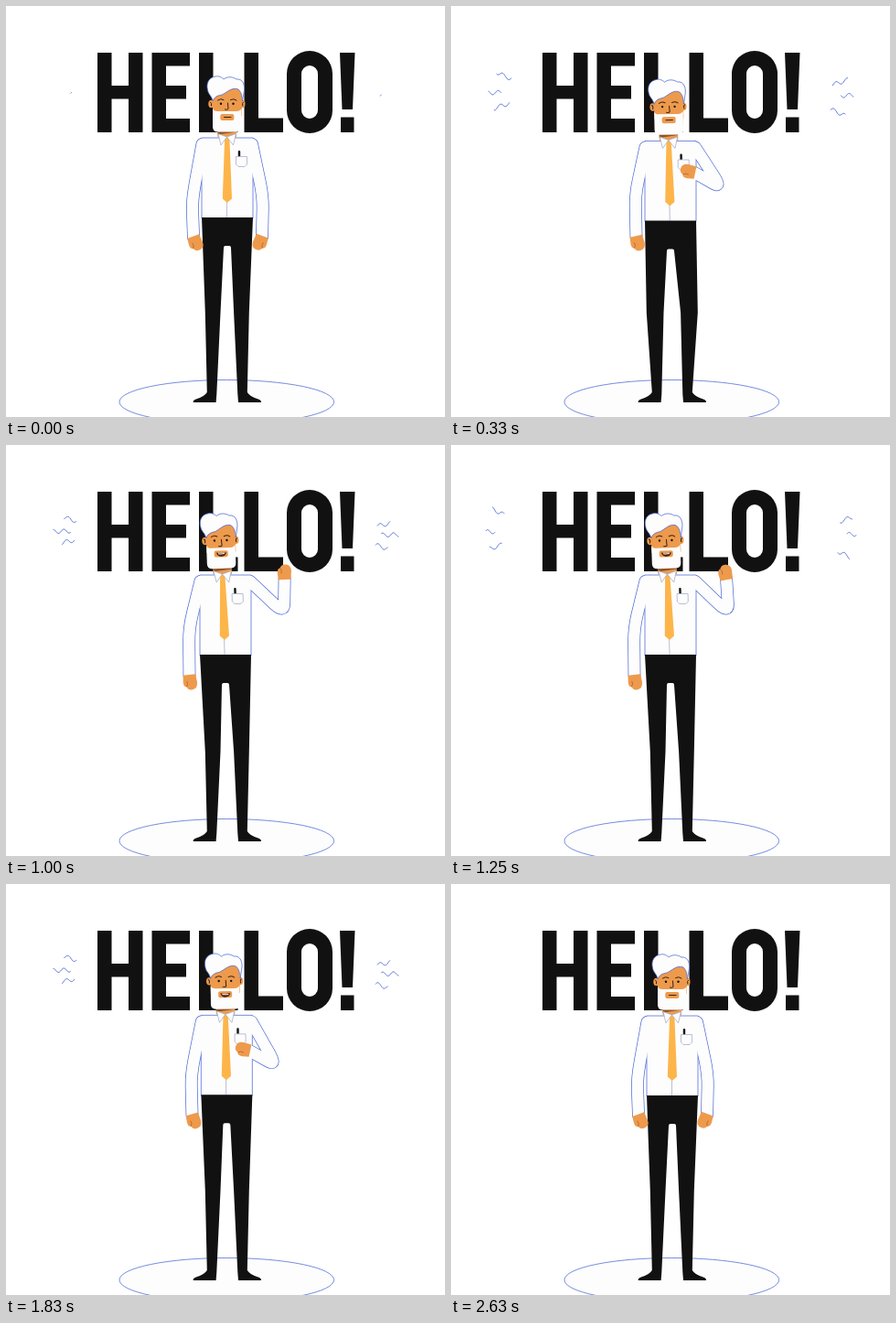
An HTML page for the animation above (2680 ms loop, 480 by 449 pixels).

```html
<!DOCTYPE html>
<html lang="en">
<head>
<meta charset="utf-8">
<title>Hello</title>
<style>
  html, body { margin: 0; width: 100%; height: 100%; overflow: hidden; background: #fff; }
  svg { display: block; width: 100%; height: 100%; }
  .ink { fill: #111; }
  .skin { fill: #ee9a4c; }
  .cloth { fill: #fdfdfd; }
  .line { stroke: #4a66d4; stroke-width: .75; }
  .thin { stroke: #a3abc6; stroke-width: .75; }
  .dark { fill: none; stroke: #33231c; stroke-linecap: round; }
  .arm { fill: none; stroke-linecap: round; stroke-linejoin: round; }
  .edge { stroke: #4a66d4; stroke-width: 13.8; }
  .sleeve { stroke: #fdfdfd; stroke-width: 12.4; }
  .spark { fill: none; stroke: #4a66d4; stroke-width: .9; }
</style>
</head>
<body>
<svg viewBox="0 0 480 449">
  <defs>
    <g id="fist">
      <path class="skin" d="M-6.800 1L-7.600 -6Q-8 -11 -4.500 -12Q-3 -16 1.500 -15.500Q7.500 -15 7.600 -8L6.800 1Z"/>
      <path d="M-4.500 -11.500Q-2 -9 -3.500 -5.500" fill="none" stroke="#a8602a" stroke-width=".7"/>
    </g>
  </defs>

  <g role="img" aria-label="HELLO!" class="ink" fill-rule="evenodd">
    <path d="M100 51H115.500V87H134V51H149.500V138H134V101.500H115.500V138H100Z"/>
    <path d="M159.500 51H201V65.500H175V87H197V101.500H175V123H201V138H159.500Z"/>
    <path id="ell" d="M211 51H226.500V122.500H253.500V138H211Z"/>
    <use href="#ell" x="49.500"/>
    <path d="M307 74A25 25 0 0 1 357 74V114A25 25 0 0 1 307 114ZM323 74V114A9 9 0 0 0 341 114V74A9 9 0 0 0 323 74Z"/>
    <path d="M365 51H381.500L379 113H367.500ZM366 121.500H380.500V138H366Z"/>
  </g>

  <g id="sparks"></g>
  <ellipse class="cloth line" cx="241.300" cy="432.500" rx="117.300" ry="24"/>

  <path class="arm edge left"/>
  <path class="arm edge right"/>
  <path class="cloth line" id="shirt" d="M214 232V144H270V232Z"/>
  <path class="arm sleeve left"/>
  <path class="arm sleeve right"/>

  <g id="front">
    <path class="skin" d="M231.500 128H252V143L241.500 146L231.500 143Z"/>
    <path d="M231.500 130H252V137.500L231.500 140.500Z" fill="#8f5526"/>
    <path class="thin" d="M241.500 212V231"/>
    <path d="M239.300 143H244L244.500 148L247 210.500L241.800 215L236.800 210.500L239 148Z" fill="#fdb54a"/>
    <path class="cloth thin" d="M232 139.500L241.500 143L235 152ZM251.500 139.500L241.500 143L248.500 152Z"/>
    <rect class="ink" x="253.800" y="158" width="2.400" height="7" rx="1"/>
    <path class="cloth thin" d="M251.500 164.500H263.500V173L261 175.500H254L251.500 173Z"/>
  </g>

  <path class="ink" id="legs"/>

  <g id="head">
    <ellipse class="skin" cx="224.500" cy="107" rx="3.200" ry="4.200"/>
    <ellipse class="skin" cx="258.500" cy="107" rx="3" ry="4.200"/>
    <path class="dark" d="M223.500 105Q225.500 106 224.500 109M259.500 105Q257.800 106 258.800 109"/>
    <path class="skin" d="M226 90H258V120H226Z"/>
    <path class="cloth" d="M226 112Q227 115 231 115H252Q256 115 257.500 112V132Q257.500 137.500 252 137.500H232Q226 137.500 226 132Z"/>
    <rect class="skin" x="234.300" y="118" width="15" height="7" rx="2"/>
    <path class="dark" id="calm" d="M238.500 121.500H246"/>
    <g id="smile">
      <path d="M236.500 120Q242 121.500 247.500 120Q246.500 124.500 242 124.500Q237.500 124.500 236.500 120Z" fill="#4a2415"/>
      <path d="M238.500 121.300Q242 122 245.500 121.300" fill="none" stroke="#fff"/>
    </g>
    <path class="dark" d="M231.500 103Q234.500 100.500 238 102.500M245.500 102.500Q249 100.500 252 103"/>
    <path class="dark" d="M242.500 106L243 112.500Q241.500 114 239.500 113"/>
    <circle class="ink" cx="235" cy="106.800" r="1.200"/>
    <circle class="ink" cx="248.500" cy="106.800" r="1.200"/>
    <path class="cloth line" d="M226 104C225 98 221.500 97 220.500 92C218.500 84 222 78 229 77C233 76 236 78 238 80C243 76 249 78 252 80C259 79 262 87 260 95L258.500 104C258 97 257 94 254 91C247 88 241 95 236 97C231 98 228 99 226 104Z"/>
  </g>

  <use href="#fist" id="left-hand"/>
  <use href="#fist" id="right-hand"/>
</svg>

<script>
  const LOOP = 2680, BURST = 830, BEAT = 432;
  const $ = id => document.getElementById(id);
  const clamp = x => Math.min(1, Math.max(0, x));
  const ramp = (t, a, b) => { const x = clamp((t - a) / (b - a)); return x * x * (3 - 2 * x); };
  const easeOut = x => 1 - (1 - clamp(x)) ** 2;
  const mix = (a, b, k) => Array.isArray(a) ? a.map((v, i) => mix(v, b[i], k)) : a + (b - a) * k;

  // Poses: elbow, wrist, hand angle
  const REST = [[281, 208], [280, 252], -160];
  const CHEST = [[296, 199], [266, 182], -78];
  const WAVE = [[304, 184], [304.5, 146], -2];
  const LEFT_REST = [[203.5, 212], [205, 252.5], 160];
  const LEFT_LEAN = [[200, 200], [200.5, 252], 173];

  const sparks = [
    { from: [77, 83], to: [42, 68], delay: 70 },
    { from: [72, 94], to: [37, 95], delay: 0 },
    { from: [75, 104], to: [39, 115], delay: 70 },
  ].flatMap(row => [0, 180].map(turn => {
    const el = document.createElementNS('http://www.w3.org/2000/svg', 'path');
    el.setAttribute('class', 'spark');
    el.setAttribute('transform', `rotate(${turn} 240.5 96.2)`);
    $('sparks').append(el);
    return { ...row, el };
  }));

  function squiggle({ from, to }, a, b) {
    if (b <= a) return '';
    const steps = 24;
    return 'M' + Array.from({ length: steps + 1 }, (_, i) => {
      const u = mix(a, b, i / steps);
      return [mix(from[0], to[0], u), mix(from[1], to[1], u ** 1.3) + 2.2 * Math.sin(u * 6 * Math.PI)];
    }).join('L');
  }

  function drawSparks(t) {
    const p = t < 3 * BURST ? t % BURST + 10 : BURST;
    for (const s of sparks) {
      const q = p - s.delay;
      s.el.setAttribute('d', squiggle(s, easeOut((q - 170) / 600), easeOut(q / 510)));
    }
  }

  function drawArm(side, shoulder, [elbow, wrist, angle], flip) {
    const d = `M${shoulder}L${mix(shoulder, elbow, .7)}Q${elbow} ${mix(elbow, wrist, .3)}L${wrist}`;
    document.querySelectorAll('.arm.' + side).forEach(el => el.setAttribute('d', d));
    $(side + '-hand').setAttribute('transform', `translate(${wrist}) rotate(${angle}) scale(${flip} 1)`);
  }

  function drawLegs(x, y, bend) {
    const hip = 231 + y, fork = 262 + y, mid = 242 + x;
    const knee = 335;
    const leg = side => {
      const at = (dx, py) => `${241.8 + side * dx} ${py}`;
      const top = dx => `${mid + side * dx}`;
      return `M${mid} ${hip}H${top(28)}L${at(24 + 4 * bend, knee)}L${at(22, 422)}` +
        `Q${at(25, 427)} ${at(34, 429.5)}Q${at(38, 431)} ${at(37, 433)}H${241.8 + side * 12.2}` +
        `L${at(11.5, 424)}L${at(7.3 + 2 * bend, knee)}L${top(4)} ${fork + 2}Q${top(4)} ${fork} ${top(2)} ${fork}H${mid}Z`;
    };
    $('legs').setAttribute('d', leg(-1) + leg(1));
  }

  function draw(t) {
    const lift = ramp(t, 40, 330) - ramp(t, 1830, 2150);
    const raise = ramp(t, 330, 660) - ramp(t, 1560, 1830);
    const lean = ramp(t, 40, 330) - ramp(t, 1560, 2000);
    const turn = ramp(t, 100, 530) - ramp(t, 1560, 2000);
    const dip = Math.sin(Math.PI * clamp((t - 80) / 500)) ** 2;
    const sway = Math.cos(2 * Math.PI * (t - 1540) / BEAT);
    const x = -2 * lean, y = 5.5 * dip - 2 * lean;

    $('shirt').setAttribute('transform', `translate(${x} ${y})`);
    // The front of the shirt leans with the turning chest
    $('front').setAttribute('transform', `matrix(1 0 ${.03 * turn} 1 ${x - 7.35 * turn} ${y})`);
    $('head').setAttribute('transform', `translate(${-6 * turn} ${y - .6 * turn}) rotate(${-2 * turn} 241 137)`);
    $('smile').style.display = t > 480 && t < 1980 ? '' : 'none';
    $('calm').style.display = t > 480 && t < 1980 ? 'none' : '';

    const [elbow, wrist, angle] = WAVE;
    const wave = [[elbow[0] + sway, elbow[1]], [wrist[0] + 7 * sway, wrist[1] - .5 * sway], angle + 17 * sway];
    drawArm('right', [269 + x, 151 + y], mix(mix(REST, CHEST, lift), wave, raise), 1);
    drawArm('left', [214.5 + x, 151 + y], mix(LEFT_REST, LEFT_LEAN, turn), -1);
    drawLegs(x, y, dip);
    drawSparks(t);
  }

  const start = performance.now();
  function frame() {
    draw((performance.now() - start) % LOOP);
    requestAnimationFrame(frame);
  }
  frame();
</script>
</body>
</html>
```
